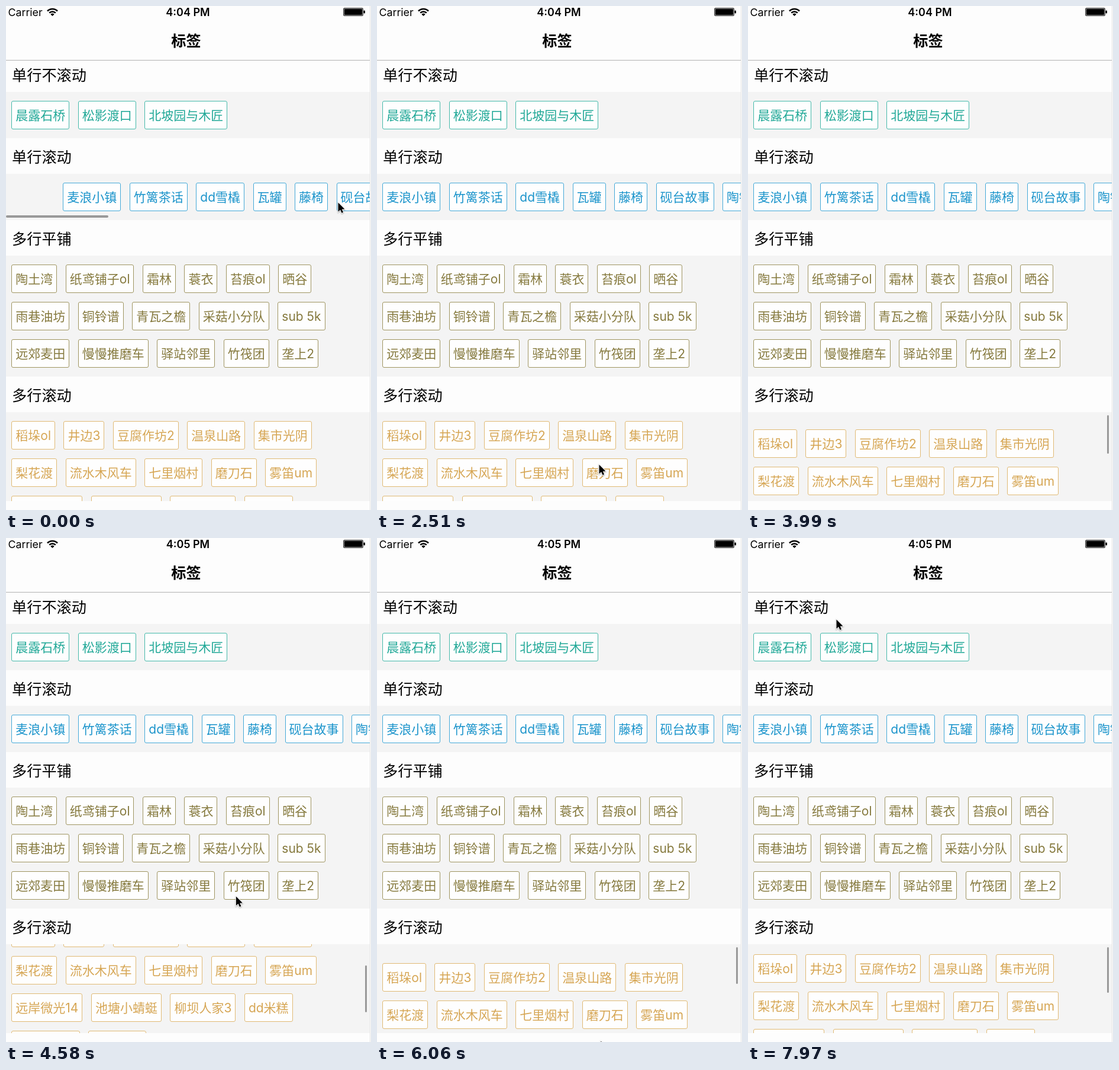
Recreate the animation shown at these times as an HTML page with a canvas. Size 617x850 px, loop 8 s.

```html
<!DOCTYPE html>
<html lang="zh-CN">
<head>
<meta charset="utf-8">
<title>标签</title>
<style>
html, body { margin: 0; width: 100%; height: 100%; overflow: hidden; background: #fdfdfd; }
canvas { display: block; }
</style>
</head>
<body>
<canvas id="stage" width="617" height="850"></canvas>
<script>
const ctx = document.getElementById('stage').getContext('2d');
const FONT = 'Inter, "Noto Sans CJK SC", "Noto Sans CJK", sans-serif';
const LOOP = 8000, STEP = 147.55, PAGE_W = 615, HEADER = 60;
const TAG = { h: 48, pad: 7, gap: 14.5, margin: 15, left: 9.3 };
const PITCH = TAG.h + TAG.margin;

const sections = [
  { title: '单行不滚动', text: '#20a897', edge: '#45b9aa',
    rows: ['晨露石桥,松影渡口,北坡园与木匠'] },
  { title: '单行滚动', text: '#1b94cb', edge: '#44a9d8',
    rows: ['麦浪小镇,竹篱茶话,dd雪橇,瓦罐,藤椅,砚台故事,陶铃,芦苇长堤,柿饼,600旅人,溪畔灯火ol,石阶3,蒲扇街坊,棉桃,榆树坡'] },
  { title: '多行平铺', text: '#85793d', edge: '#9f9561',
    rows: ['陶土湾,纸鸢铺子ol,霜林,蓑衣,苔痕ol,晒谷',
           '雨巷油坊,铜铃谱,青瓦之檐,采菇小分队,sub 5k',
           '远郊麦田,慢慢推磨车,驿站邻里,竹筏团,垄上2'] },
  { title: '多行滚动', text: '#d6a654', edge: '#e0ba75', viewH: 150,
    rows: ['稻垛ol,井边3,豆腐作坊2,温泉山路,集市光阴',
           '梨花渡,流水木风车,七里烟村,磨刀石,雾笛um',
           '远岸微光14,池塘小蜻蜓,柳坝人家3,dd米糕',
           '秋千院落ol,赶海归来'] }
];

// Stack the sections below the navigation bar
let nextTop = 145;
for (const s of sections) {
  s.contentH = s.rows.length * PITCH + TAG.margin;
  s.h = s.viewH || s.contentH;
  s.top = nextTop;
  nextTop += s.h + HEADER;
}
const list = sections[3];
const ROW_MAX = 824, LIST_MAX = list.contentH - list.h;

// Turning points: [step, value...], eased in between
const rowTurns = [[0, -87], [9, ROW_MAX], [17, 0]];
const listTurns = [[17, 0], [21, 128], [27, -14], [35, 130], [41, -17], [46, 135], [54, -2]];
const cursorTurns = [[0, 561, 331], [9, 238, 332], [12, 590, 335], [17, 375, 773], [21, 385, 650],
  [27, 378, 858], [33, 392, 515], [35, 393, 743], [41, 378, 848], [46, 385, 578], [50, 385, 800],
  [54, 149, 137]];

const clamp = (v, lo, hi) => Math.min(hi, Math.max(lo, v));
const ease = u => u * u * (3 - 2 * u);

function along(turns, step) {
  const i = clamp(turns.findLastIndex(p => p[0] <= step), 0, turns.length - 2);
  const [from, ...a] = turns[i], [to, ...b] = turns[i + 1];
  const u = ease(clamp((step - from) / (to - from), 0, 1));
  return a.map((v, k) => v + (b[k] - v) * u);
}

function rect(x, y, w, h, color) {
  ctx.fillStyle = color;
  ctx.fillRect(x, y, w, h);
}

function pill(x, y, w, h, r, color) {
  ctx.fillStyle = color;
  ctx.beginPath();
  ctx.roundRect(x, y, w, h, r);
  ctx.fill();
}

function label(str, x, y, size, color = '#000', weight = 400, align = 'left') {
  ctx.font = `${weight} ${size}px ${FONT}`;
  ctx.textAlign = align;
  ctx.fillStyle = color;
  ctx.fillText(str, x, y);
}

function drawTag(str, x, y, w, section) {
  const left = Math.round(x), right = Math.round(x + w), top = Math.round(y);
  ctx.beginPath();
  ctx.roundRect(left + 0.5, top + 0.5, right - left - 1, TAG.h - 1, 2.5);
  ctx.fillStyle = '#fefefe';
  ctx.fill();
  ctx.strokeStyle = section.edge;
  ctx.lineWidth = 1;
  ctx.stroke();
  label(str, x + TAG.pad, top + 32, 21, section.text);
}

function drawSection(section, dx, dy) {
  label(section.title, 10, section.top - 19.5, 25.2);
  ctx.save();
  ctx.beginPath();
  ctx.rect(0, section.top, PAGE_W, section.h);
  ctx.clip();
  rect(0, section.top, PAGE_W, section.h, '#f4f4f4');
  section.rows.forEach((row, i) => {
    let x = TAG.left - dx;
    const y = section.top + TAG.margin + i * PITCH - dy;
    for (const name of row.split(',')) {
      ctx.font = `400 21px ${FONT}`;
      const w = ctx.measureText(name).width + TAG.pad * 2;
      drawTag(name, x, y, w, section);
      x += w + TAG.gap;
    }
  });
  ctx.restore();
}

// The bar shrinks while the content is pulled past either end
function scrollBar(offset, max, track, full) {
  const past = Math.max(0, -offset, offset - max);
  const start = (track - full) * clamp(offset / max, 0, 1) + (offset > max ? past : 0);
  return [start, full - past];
}

function drawWifi(x, y) {
  const from = -Math.PI * 0.75, to = -Math.PI * 0.25;
  ctx.fillStyle = ctx.strokeStyle = '#000';
  ctx.lineWidth = 2.6;
  ctx.beginPath();
  ctx.moveTo(x, y);
  ctx.arc(x, y, 4.4, from, to);
  ctx.fill();
  for (const r of [7.5, 12]) {
    ctx.beginPath();
    ctx.arc(x, y, r, from, to);
    ctx.stroke();
  }
}

function drawBattery(x, y) {
  pill(x, y, 34, 14, 2.5, '#333');
  pill(x + 1, y + 1, 32, 12, 1.5, '#999');
  pill(x + 2, y + 2, 30, 10, 1, '#000');
  pill(x + 34.5, y + 4.5, 2.5, 5, 1, '#000');
}

function drawTopBar(clock) {
  label('Carrier', 3.5, 17, 17.8);
  drawWifi(78.5, 17);
  label(clock, 307.5, 17, 18, '#000', 600, 'center');
  drawBattery(570, 3);
  label('标签', 304.5, 67.5, 25.2, '#000', 600, 'center');
  rect(0, 91, PAGE_W, 1, '#b2b2b2');
}

function drawCursor(x, y) {
  const outline = new Path2D('M0 0V15.5L3.6 12.2L6 17.6L8.6 16.5L6.3 11.2L11 11Z');
  ctx.save();
  ctx.translate(x + 0.5, y + 0.5);
  ctx.shadowColor = 'rgba(0,0,0,.35)';
  ctx.shadowBlur = 2;
  ctx.shadowOffsetY = 1;
  ctx.strokeStyle = '#fff';
  ctx.lineWidth = 1.8;
  ctx.stroke(outline);
  ctx.shadowColor = 'transparent';
  ctx.fillStyle = '#000';
  ctx.fill(outline);
  ctx.restore();
}

function draw(time) {
  const step = Math.floor(time / STEP);
  const [rowX] = along(rowTurns, step);
  const [listY] = along(listTurns, step);

  rect(0, 0, 617, 850, '#fdfdfd');
  for (const s of sections) drawSection(s, s === sections[1] ? rowX : 0, s === list ? listY : 0);
  if (step < 17) {
    const [start, len] = scrollBar(rowX, ROW_MAX, 610, 260);
    pill(start, 353, len, 4, 2, '#999');
  } else if (step > 17) {
    const [start, len] = scrollBar(listY, LIST_MAX, 141, 79);
    pill(607, 690 + start, 3, len, 1.5, '#999');
  }
  drawTopBar(step < 29 ? '4:04 PM' : '4:05 PM');
  rect(PAGE_W, 0, 1, 850, '#e4e4e4');
  drawCursor(...along(cursorTurns, step));
}

function tick(now) {
  draw(now % LOOP);
  requestAnimationFrame(tick);
}
draw(0);
requestAnimationFrame(tick);
</script>
</body>
</html>
```
